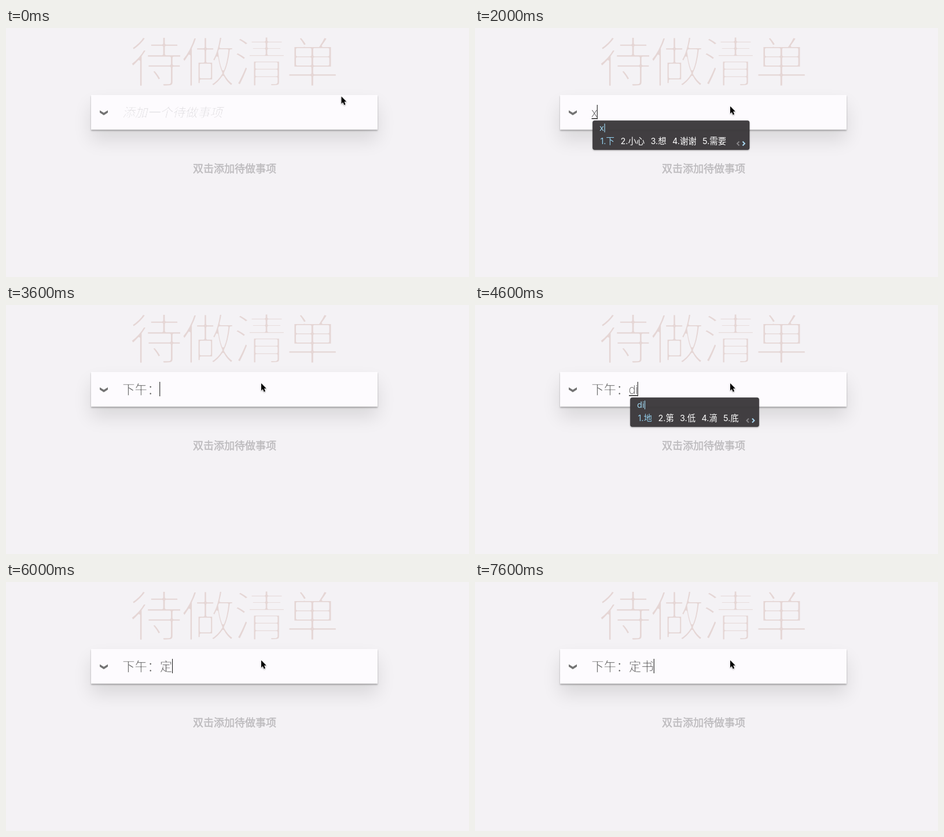
Recreate the animation shown at these times as an HTML page. Size 800 by 431 pixels, loop 8000 ms.

```html
<!DOCTYPE html>
<html lang="zh-CN">
<head>
<meta charset="utf-8">
<style>
html, body { margin: 0; width: 100%; height: 100%; overflow: hidden; background: #f4f2f5; }
svg { position: absolute; left: 0; top: 0; }
.card { position: absolute; left: 147px; top: 116px; width: 495px; height: 59.5px; background: #fdfbfe;
  box-shadow: 0 1.5px 2.5px rgba(0,0,0,.27), 0 18px 32px rgba(0,0,0,.11), inset 0 -1.8px 1px rgba(0,0,0,.03); }
text { font-family: "Noto Sans CJK SC", "Noto Sans CJK", sans-serif; stroke-linejoin: round; }
/* A stroke in the backdrop colour thins the regular weight. */
.title { font-size: 94.5px; letter-spacing: -4.5px; fill: #e5d6d5; stroke: #f4f2f5; stroke-width: 4.3px; }
.entry { font-size: 21.6px; fill: #555; stroke: #fdfbfe; stroke-width: .75px; }
.hint { font-style: italic; fill: #dfdde0; }
.pinyin { font: 200 20.5px Inter, sans-serif; letter-spacing: -.7px; stroke: none; }
.empty { font-size: 18px; fill: #bdbbbe; stroke: #bdbbbe; stroke-width: .5px; }
.paste { font-size: 12px; font-weight: 700; fill: #fff; }
.comp { font: 14.5px Inter, sans-serif; fill: #9fd6f0; }
.cand { font-family: Inter, "Noto Sans CJK SC", "Noto Sans CJK", sans-serif; font-size: 14.4px; fill: #fff; }
.cand:first-child { fill: #92cdea; }
</style>
</head>
<body>
<div class="card"></div>
<svg width="800" height="431" viewBox="0 0 800 431">
  <defs>
    <filter id="soft" x="-20%" y="-30%" width="140%" height="190%">
      <feDropShadow dx="0" dy="1" stdDeviation="1.2" flood-opacity=".4"/>
    </filter>
    <g id="down">
      <rect y="-15" width="17" height="18" rx="3" fill="#7f9db8"/>
      <path d="M6-13h5v6h4l-6.500 7-6.500-7h4z" fill="#fff"/>
    </g>
    <g id="books">
      <path d="M1-12l9-3 5 6-10 3z" fill="#58a83c"/>
      <path d="M1-12l4 6v3l-4-6z" fill="#2f6b25"/>
      <path d="M5-5l10-3v2L5-3z" fill="#eee8dc"/>
      <path d="M1-5l4 2 10-3v3L5 0l-4-2z" fill="#c8403a"/>
      <path d="M2-1l3 1 10-2v2L5 2z" fill="#eadfce"/>
      <path d="M1 0l4 2 10-2v1L5 3 1 2z" fill="#a52c2c"/>
    </g>
  </defs>
  <text class="title" x="212.300" y="94.200">待做清单</text>
  <path d="M162 142.500l7 4.300 7-4.300v3.900l-7 4.500-7-4.500z" fill="#737373"/>
  <text class="empty" x="323" y="250">双击添加待做事项</text>
  <text class="entry hint" id="hint" x="201" y="153.500">添加一个待做事项</text>
  <text class="entry" id="done" x="201" y="153.500"></text>
  <text class="entry pinyin" id="raw" y="153.500"></text>
  <rect id="line" y="156" height="1.500" fill="#222"/>
  <rect id="caret" y="133" width="1.100" height="25" fill="#222"/>
  <g id="ime">
    <rect id="box" y="160.500" height="50" rx="3" fill="#3b393c" fill-opacity=".95" stroke="#2c2a2d" stroke-opacity=".6" filter="url(#soft)"/>
    <text class="comp" id="comp" y="178"></text>
    <rect id="mark" y="165.500" width="1.200" height="15" fill="#9fd6f0"/>
    <g id="list"></g>
    <g id="arrows" fill="none" stroke-width="2">
      <path d="M-18.500 196.500l-3.500 3.500 3.500 3.500" stroke="#858386"/>
      <path d="M-12.500 196.500l3.500 3.500-3.500 3.500" stroke="#a9d8f2"/>
    </g>
  </g>
  <g id="paste">
    <rect x="423" y="99" width="44" height="24" rx="5" fill="#353336" filter="url(#soft)"/>
    <text class="paste" x="433" y="115.500">粘贴</text>
  </g>
  <path id="mouse" d="M.5.5v12.500l2.800-2.600 2 4.800 2.200-.9-2-4.700h3.800z" fill="#000" stroke="#fff" paint-order="stroke" filter="url(#soft)"/>
</svg>
<script>
const $ = id => document.getElementById(id);
const LOOP = 8000;
const ime = (x, right, comp, cands, mark = 1) => ({ x, right, comp, cands: cands.split(' '), mark });
const start = { mouse: [579, 118], hint: 1, done: '', raw: '', rawX: 201, caret: 0, ime: null, paste: 0 };

// Each step changes only the listed properties.
const steps = [
  [0, {}],
  [200, { mouse: [464, 121] }],
  [600, { mouse: [440.5, 135] }],
  [1000, { caret: 201 }],
  [1200, { paste: .85 }],
  [1600, { paste: 1, caret: 0 }],
  [2000, { paste: 0, hint: 0, raw: 'x', caret: 211, ime: ime(203, 474, 'x', '下 小心 想 谢谢 需要') }],
  [2200, { raw: 'xi', caret: 215, ime: ime(203, 485.5, 'xi', '喜欢 希望 西瓜 洗 系统') }],
  [2600, { raw: "xia'wu", caret: 256, ime: ime(203, 485.5, "xia'w", '夏晚 下午 下文 虾 ↓') }],
  [2800, { ime: ime(203, 485.5, "xia'wu", '下午 下雾 霞梧 下 ↓') }],
  [3000, { raw: '', ime: null, done: '下午', caret: 244 }],
  [3600, { done: '下午：', caret: 265.5 }],
  [4000, { caret: 0 }],
  [4600, { raw: 'di', rawX: 265.5, caret: 281, ime: ime(268, 490.5, 'di', '地 第 低 滴 底') }],
  [4800, { raw: 'din', caret: 292.6, ime: ime(268, 635, 'din', '地 低年级生 第那个 定时器 定期存款', 0) }],
  [5000, { ime: ime(268, 635, 'din', '定 订单号码 顶楼层 定时器 定期存款') }],
  [5200, { caret: 0 }],
  [5800, { caret: 292.6 }],
  [6000, { raw: '', ime: null, done: '下午：定', caret: 287.3 }],
  [6600, { raw: 's', rawX: 287.5, caret: 298, ime: ime(290, 527, 's', '是 上 说 时 什么') }],
  [6800, { raw: 'sh', caret: 309, ime: ime(290, 519, 'sh', '是 上 说 时 使') }],
  [7000, { raw: 'shu', caret: 320, ime: ime(290, 519, 'shu', '书 ≡ 数 输 熟') }],
  [7200, { ime: null }],
  [7600, { raw: '', done: '下午：定书', caret: 309 }]
];
let last = start;
const states = steps.map(([t, change]) => ({ t, ...(last = { ...last, ...change }) }));

const set = (id, attrs) => { for (const k in attrs) $(id).setAttribute(k, attrs[k]); };
const show = (id, on) => set(id, { opacity: on ? 1 : 0 });
const icons = { '↓': 'down', '≡': 'books' };

function drawList({ x, cands }) {
  let at = x + 13.5, out = '';
  cands.forEach((word, i) => {
    const icon = icons[word];
    out += `<text class="cand" x="${at}" y="201">${i + 1}.${icon ? '' : word}</text>`;
    if (icon) out += `<use href="#${icon}" x="${at + 13}" y="201"/>`;
    if (icon === 'down') out += `<rect x="${at + 33}" y="188.5" width="7.5" height="5" rx="1.5" fill="none" stroke="#ddd"/><path d="M${at + 35} 191h3.500" stroke="#ddd"/>`;
    at += (i ? 23 : 20.5) + 14.5 * (icon ? 1.38 : word.length);
  });
  $('list').innerHTML = out;
}

function draw(s) {
  set('mouse', { transform: `translate(${s.mouse})` });
  show('hint', s.hint);
  $('done').textContent = s.done;
  $('raw').textContent = s.raw;
  set('raw', { x: s.rawX });
  const len = s.raw ? $('raw').getComputedTextLength() : 0;
  set('line', { x: s.rawX + .5, width: Math.max(0, len - .5) });
  show('caret', s.caret);
  set('caret', { x: s.caret - .3 });
  set('paste', { opacity: s.paste });
  show('ime', s.ime);
  if (!s.ime) return;
  const { x, right, comp, mark } = s.ime;
  set('box', { x: x + .5, width: right - x - .5 });
  $('comp').textContent = comp;
  set('comp', { x: x + 12 });
  set('mark', { x: x + 12.5 + $('comp').getComputedTextLength(), opacity: mark });
  set('arrows', { transform: `translate(${right + 1})` });
  drawList(s.ime);
}

const origin = performance.now();
let shown = null;
function frame(now) {
  const t = Math.max(0, now - origin) % LOOP;
  const s = states.findLast(k => k.t <= t);
  if (s !== shown) draw(shown = s);
  requestAnimationFrame(frame);
}
frame(origin);
</script>
</body>
</html>
```
